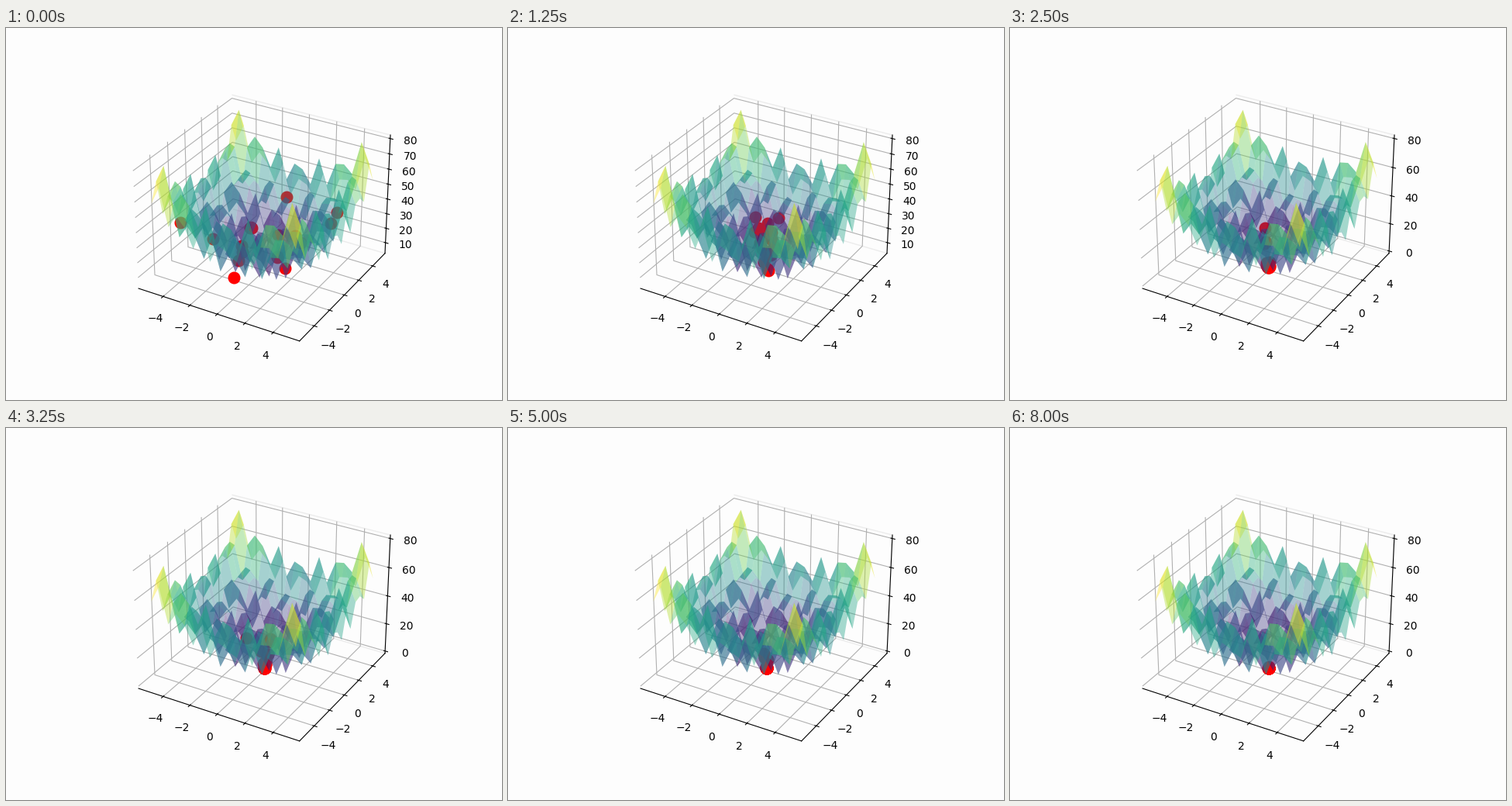
Animation, 640 px wide and 480 px high, one loop 8250 ms. Source, as a matplotlib script:

```python
import numpy as np
import matplotlib.pyplot as plt
from matplotlib.animation import FuncAnimation
from matplotlib.ticker import MultipleLocator

FRAMES, INTERVAL = 33, 250
COUNT = 18
BOUND = 5.12
FOUND = 6  # step at which the swarm reaches the optimum
PAPER = "#fdfdfd"


def rastrigin(x, y):
    return 20 + x**2 + y**2 - 10 * (np.cos(2 * np.pi * x) + np.cos(2 * np.pi * y))


START = np.random.default_rng(7).uniform(-4, 4, (2, COUNT))


def swarm(i):
    """Particles contract onto the origin with a fading, heavy-tailed wander."""
    wander = np.random.default_rng(i).normal(size=START.shape) ** 3
    wander *= 0.3 * np.exp(-i / 7) * (i > 0)
    x, y = np.clip(START * np.exp(-i / 2.5) + wander, -4.5, 4.5)
    return x, y, rastrigin(x, y)


grid = np.arange(-BOUND, BOUND, 0.6)
X, Y = np.meshgrid(grid, grid)
Z = rastrigin(X, Y)

fig = plt.figure(figsize=(6.4, 4.8), dpi=100, facecolor=PAPER)
ax = fig.add_subplot(projection="3d", facecolor=PAPER)
ax.plot_surface(X, Y, Z, cmap="viridis", alpha=0.4)
dots, = ax.plot(*swarm(0), "ro", markersize=10, markeredgewidth=1.5, zorder=2)
for axis, edge in ((ax.xaxis, "none"), (ax.yaxis, "#ececec"), (ax.zaxis, "none")):
    axis.pane.set(alpha=1, facecolor="none", edgecolor=edge)


def update(i):
    dots.set_data_3d(*swarm(i))
    low, step = (Z.min(), 10) if i < FOUND else (0, 20)
    margin = (Z.max() - low) / 48
    ax.set_zlim(low - margin, Z.max() + margin)
    ax.zaxis.set_major_locator(MultipleLocator(step))
    return (dots,)


anim = FuncAnimation(fig, update, frames=FRAMES, interval=INTERVAL,
                     repeat=True, repeat_delay=0, blit=False)
plt.show()
```
